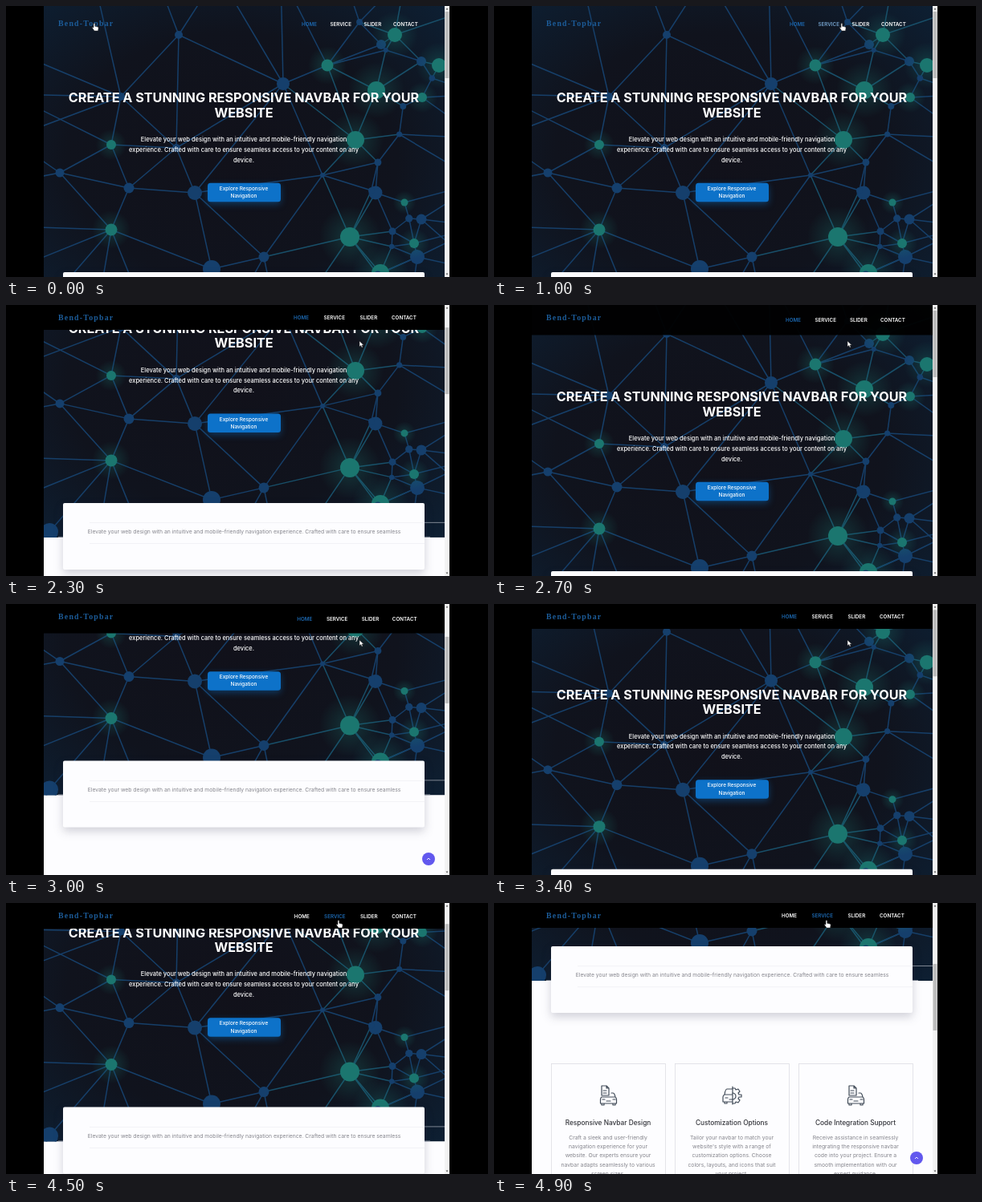
An HTML page that plays this animation: 600x338 px, repeating every 5 s.

```html
<!DOCTYPE html>
<html lang="en">
<head>
<meta charset="utf-8">
<title>Responsive navbar</title>
<style>
  html, body { margin: 0; width: 100%; height: 100%; overflow: hidden; background: #000; }
  svg { display: block; }
  text { font-family: Inter, "Open Sans", sans-serif; }
  .mid { text-anchor: middle; }
  .h1 { font-size: 16.2px; font-weight: 700; fill: #fff; }
  .lead { font-size: 7.48px; font-weight: 500; fill: #fff; }
  .btn { font-size: 6.45px; font-weight: 500; fill: #fff; }
  .note { font-size: 6.77px; fill: #85858c; }
  .h3 { font-size: 8.3px; font-weight: 500; fill: #33343a; }
  .desc { font-size: 6.8px; fill: #85858c; }
  .link { font-size: 6.25px; font-weight: 600; }
  .logo { font: 700 9.8px "Liberation Serif", serif; letter-spacing: 1.25px; fill: #1c5c99; }
  .icon { fill: none; stroke: #414b58; stroke-width: 1.2; stroke-linejoin: round; stroke-linecap: round; }
  .cursor { fill: #fff; stroke: #222; stroke-width: .5; }
  .card { filter: drop-shadow(0 5px 6px rgba(30, 30, 60, .2)); }
  .glow { filter: drop-shadow(0 3px 4px rgba(13, 114, 201, .4)); }
</style>
</head>
<body>
<svg width="600" height="338" viewBox="0 0 600 338">
  <defs>
    <clipPath id="view"><rect x="47" width="499" height="338"/></clipPath>
    <clipPath id="heroBox"><rect x="47" width="499" height="375"/></clipPath>
    <radialGradient id="night" cx=".47" cy=".5" r=".75">
      <stop offset="0" stop-color="#11111a"/>
      <stop offset=".55" stop-color="#10131d"/>
      <stop offset="1" stop-color="#0d2034"/>
    </radialGradient>
    <radialGradient id="halo">
      <stop offset="0" stop-color="#1b766f" stop-opacity=".35"/>
      <stop offset="1" stop-color="#1b766f" stop-opacity="0"/>
    </radialGradient>
    <g id="car" class="icon">
      <path d="M-8 -12h6l3 3v9h-9zM-2 -12v3h3M-6 -6h4M-6 -3h4"/>
      <path d="M4 -3h2q2 0 3 5M-8 2h17q1.500 1 1.500 3v5h-20v-5q0 -2 1.500 -3zM-8 10v2h3v-2M6 10v2h3v-2M-7 5h3M6 5h3M-2 7h5"/>
    </g>
    <g id="gearCar" class="icon">
      <path d="M1 -8h-7q-2 0 -3 7h10M-9 -1q-2 1 -2 3v6h12M-9 8v2h3v-2M-8 3h3M-3 5h4M1 -11v22"/>
      <path d="M1 -9h3l1 2 3 -1 2 3 -2 2 1 2h3v3h-3l-1 2 2 2-2 3-3 -1-1 2h-3M1 -3a4 4 0 0 1 0 8"/>
    </g>
  </defs>
  <g clip-path="url(#view)">
    <g id="page">
      <rect x="47" width="499" height="760" fill="#fdfdff"/>
      <g clip-path="url(#heroBox)">
        <rect x="47" width="499" height="375" fill="url(#night)"/>
        <g id="net"></g>
      </g>
      <g id="copy"></g>
    </g>
    <g id="toTop">
      <circle cx="526" cy="318" r="8" fill="#6258ee"/>
      <path d="M524 319l2 -2 2 2" fill="none" stroke="#fff" stroke-width=".9"/>
    </g>
    <rect id="bar" x="47" width="499"/>
    <text id="logo" class="logo" x="65">Bend-Topbar</text>
    <g id="links"></g>
  </g>
  <rect x="546" width="6" height="338" fill="#f3f3f3"/>
  <rect id="thumb" x="546.500" width="5" height="83" fill="#bdbdbd"/>
  <path d="M547.500 4.500l1.500 -2 1.500 2zM547.500 333.500l1.500 2 1.500 -2z" fill="#555"/>
  <path id="arrow" class="cursor" d="M0 0v7l1.700 -1.500 1.200 2.600 1.300 -.6 -1.200 -2.500h2.300z"/>
  <path id="hand" class="cursor" d="M-1 0q1 -1 1.800 0v3.300l3.400 .8q1 .3 .9 1.300l-.5 3.600h-4.600l-2.800 -4q.2 -1.200 1.800 0z"/>
</svg>
<script>
const LOOP = 5000, STEP = 100;
const $ = id => document.getElementById(id);
const clamp = v => Math.max(0, Math.min(1, v));
const mix = (a, b, k) => a + (b - a) * k;

function add(parent, tag, attrs, text) {
  const el = document.createElementNS("http://www.w3.org/2000/svg", tag);
  for (const k in attrs) el.setAttribute(k, attrs[k]);
  if (text) el.textContent = text;
  return parent.appendChild(el);
}

const net = $("net"), copy = $("copy");
const lines = (cls, x, y, gap, rows) => rows.forEach((row, i) =>
  add(copy, "text", { class: cls + " mid", x, y: y + i * gap }, row));
const rect = (x, y, width, height, more) => add(copy, "rect", { x, y, width, height, ...more });

// Main network nodes: x, y, radius
const BLUE = "#153f6c", TEAL = "#1b766f";
const blue = [
  [215,36,5], [345,97,8], [467,48,6], [517,69,6], [143,113,5], [212,177,5], [67,208,5.5],
  [153,227,6.5], [235,233,9], [460,233,8.5], [394,211,3], [321,313,6.5], [256,328,11],
  [481,281,4.5], [517,266,6.5], [512,313,9], [54,368,11]
];
const teal = [
  [400,74,7.5], [484,36,9], [539,74,9], [461,105,11], [435,167,11], [131,173,6],
  [131,279,7.5], [518,114,6], [428,288,12], [508,296,6], [466,333,11], [496,245,4.5]
];
const node = color => ([x, y, r]) => ({ x, y, r, color });
const nodes = [...blue.map(node(BLUE)), ...teal.map(node(TEAL))];

// Small dots crowd the right edge; a ring outside the view lets lines run off it
let seed = 11;
const rnd = () => (seed = seed * 16807 % 2147483647) / 2147483647;
for (let i = 0; i < 10; i++)
  nodes.push({ x: 440 + rnd() * 105, y: 20 + i * 35, r: 3 + rnd() * 2, color: BLUE });
for (let i = 0; i < 8; i++) {
  for (const y of [-40, 415]) nodes.push({ x: 30 + i * 78, y, r: 0, color: BLUE });
  for (const x of [5, 590]) nodes.push({ x, y: i * 55, r: 0, color: BLUE });
}

// Two nodes are linked when no other lies near the middle between them
function linked(a, b) {
  const reach = Math.hypot(a.x - b.x, a.y - b.y) * .43;
  const mx = (a.x + b.x) / 2, my = (a.y + b.y) / 2;
  return reach < 100 && nodes.every(n => n === a || n === b || Math.hypot(n.x - mx, n.y - my) > reach);
}
nodes.forEach((a, i) => nodes.slice(i + 1).forEach(b => {
  if (!linked(a, b)) return;
  const bright = [a, b].some(n => n.color === TEAL && n.r > 8);
  add(net, "line", { x1: a.x, y1: a.y, x2: b.x, y2: b.y,
    stroke: bright ? "#184f69" : "#163f69", "stroke-width": 1.5 });
}));
for (const { x, y, r, color } of nodes) {
  if (color === TEAL) add(net, "circle", { cx: x, cy: y, r: r * 3.2, fill: "url(#halo)" });
  add(net, "circle", { cx: x, cy: y, r, fill: color });
}

lines("h1", 296, 120.4, 18.2, ["CREATE A STUNNING RESPONSIVE NAVBAR FOR YOUR", "WEBSITE"]);
lines("lead", 296, 168.9, 12.8, [
  "Elevate your web design with an intuitive and mobile-friendly navigation",
  "experience. Crafted with care to ensure seamless access to your content on any",
  "device."
]);
rect(251, 220.7, 91, 23.5, { rx: 3.5, fill: "#0d72c9", class: "glow" });
lines("btn", 296, 229.8, 9.2, ["Explore Responsive", "Navigation"]);

rect(521, 356, 25, .8, { fill: "#9aa0aa" });
rect(65, 374, 463, .8, { fill: "#9aa0aa" });
rect(71, 332, 450, 83, { rx: 2, fill: "#fdfdff", class: "card" });
for (const y of [356.5, 382.5]) rect(104, y, 417, .6, { fill: "#ececf0" });
lines("note", 296.5, 370.4, 0, ["Elevate your web design with an intuitive and mobile-friendly navigation experience. Crafted with care to ensure seamless"]);

[
  ["car", "Responsive Navbar Design", "Craft a sleek and user-friendly", "navigation experience for your",
    "website. Our experts ensure your", "navbar adapts seamlessly to various", "screen sizes."],
  ["gearCar", "Customization Options", "Tailor your navbar to match your", "website's style with a range of",
    "customization options. Choose", "colors, layouts, and icons that suit", "your project."],
  ["car", "Code Integration Support", "Receive assistance in seamlessly", "integrating the responsive navbar",
    "code into your project. Ensure a", "smooth implementation with our", "expert guidance."]
].forEach(([icon, title, ...rows], i) => {
  const x = 71 + i * 154;
  rect(x + .5, 478.5, 142, 160, { fill: "#fdfdff", stroke: "#dedee4", "stroke-width": .8 });
  add(copy, "use", { href: "#" + icon, x: x + 71, y: 518 });
  lines("h3", x + 71, 555, 0, [title]);
  lines("desc", x + 71, 573.2, 11.1, rows);
});

// Navbar links: label, left edge when tall, left edge when compact
const links = [
  ["HOME", 368, 358], ["SERVICE", 403.5, 395.5], ["SLIDER", 445.5, 440.5], ["CONTACT", 482, 480]
].map(([label, tall, compact]) => ({ label, tall, compact, el: add($("links"), "text", { class: "link" }, label) }));

// Two wheel scrolls down and back, then a smooth jump to the services
const CLICK = 4143;
const wheel = (t, mid, half, peak) =>
  Math.abs(t - mid) < half ? peak * Math.cos((t - mid) / half * Math.PI / 2) ** 2 : 0;
const scrollAt = t => wheel(t, 2050, 620, 131) + wheel(t, 3080, 340, 157)
  + 278 * (Math.max(0, t - CLICK) / 757) ** 1.7;

// The bar shrinks while the page is scrolled
const shrink = (t, from, to) => clamp((t - from) / 400) - clamp((t - to) / 300);
const navAt = t => shrink(t, 1530, 2550) + shrink(t, 2770, 3420) + shrink(t, 4130, LOOP);

// Cursor stops: ms, x, y
const stops = [[200, 110, 22], [600, 376, 22], [1450, 497, 22], [1600, 440, 45], [3500, 440, 45], [3900, 414, 22]];
function cursorAt(t) {
  const i = stops.findIndex(s => s[0] > t);
  if (i === 0) return stops[0].slice(1);
  if (i < 0) return stops[stops.length - 1].slice(1);
  const [a, b] = [stops[i - 1], stops[i]], k = (t - a[0]) / (b[0] - a[0]);
  return [mix(a[1], b[1], k), mix(a[2], b[2], k)];
}

const tint = k => `rgb(${mix(255, 28, k)},${mix(255, 104, k)},${mix(255, 176, k)})`;
const show = (el, on) => el.setAttribute("opacity", on ? 1 : 0);

function draw(t) {
  const y = scrollAt(t), nav = navAt(t), [cx, cy] = cursorAt(t);
  $("page").setAttribute("transform", `translate(0 ${-y})`);
  $("thumb").setAttribute("y", 7 + y * .248);
  show($("toTop"), y > 100);

  $("bar").setAttribute("height", mix(44, 31, nav));
  $("bar").setAttribute("fill-opacity", Math.min(1, nav * 1.9));
  $("logo").setAttribute("y", nav > 0 ? 19 : 25);
  for (const { label, tall, compact, el } of links) {
    const x = mix(tall, compact, nav);
    const hover = cy < 26 ? clamp(1.7 - Math.abs(cx - x - 14) / 14) : 0;
    el.setAttribute("x", x);
    el.setAttribute("y", mix(24.8, 18, nav));
    el.setAttribute("fill", tint(label === "HOME" && t < CLICK ? 1 : hover));
  }

  const pointing = cy < 26 && (cx < 135 || cx > 360);
  for (const id of ["arrow", "hand"]) {
    $(id).setAttribute("transform", `translate(${cx} ${cy})`);
    show($(id), pointing === (id === "hand"));
  }
}

function tick() {
  const t = performance.now() % LOOP;
  draw(Math.floor(t / STEP) * STEP);
  requestAnimationFrame(tick);
}
tick();
</script>
</body>
</html>
```
